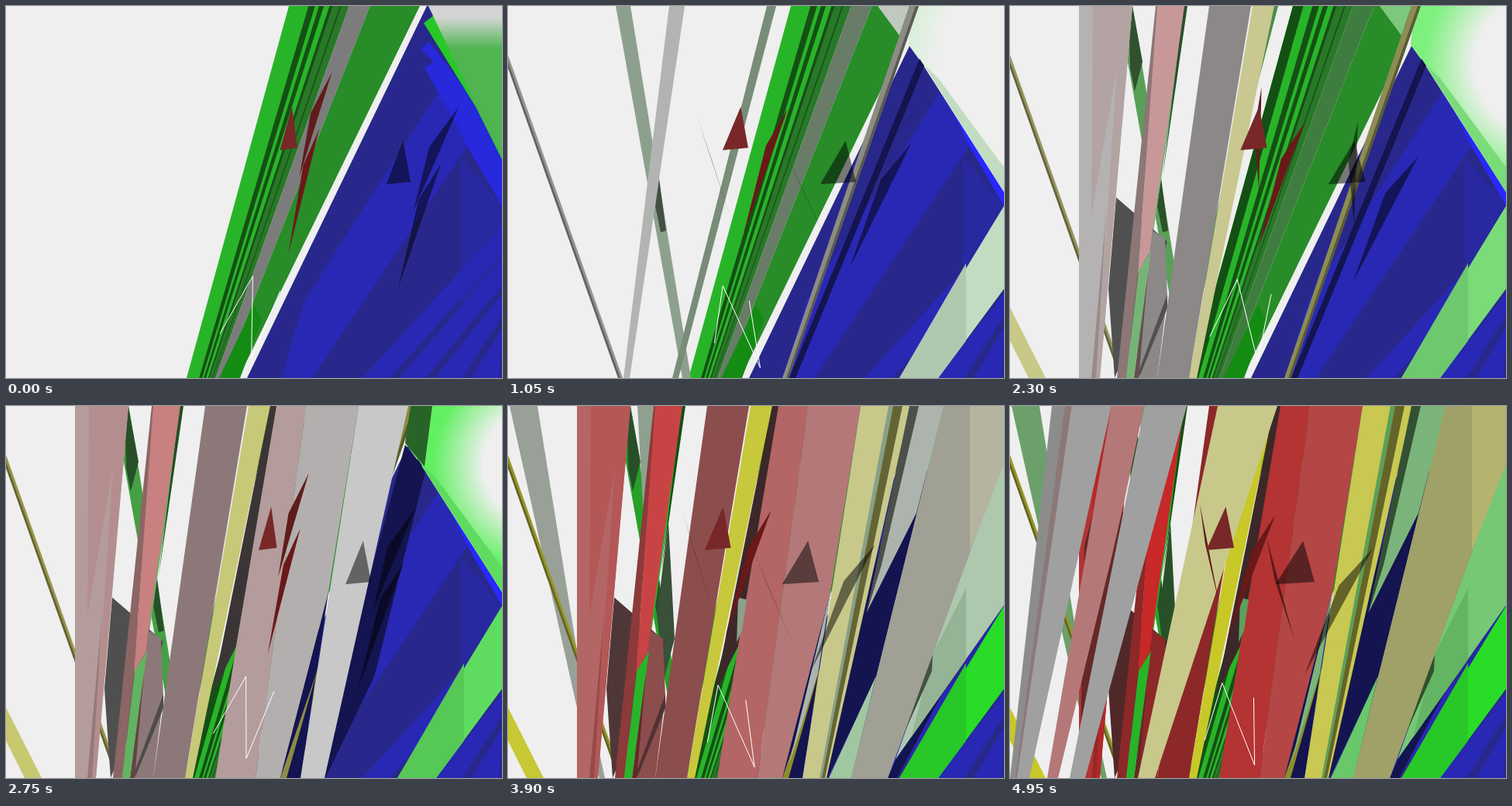
An HTML page with a canvas that plays this animation: 640 px wide and 480 px high, repeating every 5 s.

```html
<!DOCTYPE html>
<html>
<head>
<meta charset="utf-8">
<style>
html, body { margin: 0; width: 100%; height: 100%; overflow: hidden; background: #efefef; }
canvas { display: block; width: 640px; height: 480px; }
</style>
</head>
<body>
<canvas id="stage" width="640" height="480"></canvas>
<script>
const ctx = document.getElementById('stage').getContext('2d');
const LOOP = 5000, STEP = 50, PAPER = '#efefef', NIGHT = '#141450';
const paths = new Map();
let now = 0;

// Fill a polygon once its start time has come.
function poly(start, color, points) {
  if (now < start) return;
  if (!paths.has(points)) paths.set(points, new Path2D('M' + points + 'Z'));
  ctx.fillStyle = color;
  ctx.fill(paths.get(points));
}

// A full-height beam: top edge a..b, bottom edge c..d.
function beam(start, color, a, b, c, d) {
  poly(start, color, `${a} 0 ${b} 0 ${d} 480 ${c} 480`);
}

// Gray that drains toward a hue, at a rate in proportion to its brightness.
function hue(channels, high, since, floor = 40) {
  const drained = high * (1 - 0.000265 * Math.max(0, now - since));
  const low = Math.round(Math.max(floor, drained));
  return 'rgb(' + [...'rgb'].map(c => channels.includes(c) ? high : low) + ')';
}

function drawBlue() {
  poly(0, '#28288c', '543 0 640 0 640 480 311 480');
  poly(0, '#2828b4', '566 98 596 180 395 480 355 480 385 380');
  poly(0, '#2828a0', '587 195 640 258 640 365 587 420');
  for (let i = 0; i < 4; i++) {
    const y = 283 + 44 * i, x = 460 + 47 * i;
    poly(0, '#2828b4', `640 ${y} 640 ${y + 36 - 4 * i} ${x + 35} 480 ${x} 480`);
  }
  poly(0, '#2828ff', '560 108 545 80 640 190 640 258 595 180');
  if (now >= 550) return;
  poly(0, '#2828dc', '535 56 546 46 640 170 640 256 540 80 552 72');
  poly(0, '#28c828', '539 22 552 12 640 170 640 198 606 130');
  const sky = ctx.createLinearGradient(0, 15, 0, 55);
  sky.addColorStop(0, '#d4d4d4');
  sky.addColorStop(1, '#50b450');
  poly(0, sky, '545 0 640 0 640 196 612 140');
}

// Stripes run between the two edges of the band, crowding left at the top.
function greenStripe(color, from, to, start = 0) {
  const top = u => 365 + 169 * u, bottom = u => 233 + 67 * u ** 0.75;
  beam(start, color, top(from), top(to), bottom(from), bottom(to));
}

function drawGreen() {
  greenStripe('#28b428', 0, 0.31);
  greenStripe('#287828', 0.31, 0.46);
  greenStripe(hue('g', 124, 450), 0.46, 0.62);
  greenStripe('#288c28', 0.62, 1);
  for (let i = 0; i < 4; i++) greenStripe('#145014', 0.15 + 0.08 * i, 0.2 + 0.067 * i);
  greenStripe('#145014', 0, 0.08, 1500);
  poly(0, '#148c14', '275 480 302 480 330 405 320 385');
}

function drawCorner() {
  if (now < 550) return;
  const opening = '522 0 640 0 640 240 535 75 517 50';
  poly(0, PAPER, '543 0 ' + opening);
  const inner = Math.max(5, 135 - Math.max(0, now - 1050) * 0.036);
  const glow = ctx.createRadialGradient(690, 75, inner, 690, 75, inner + 65);
  glow.addColorStop(0, PAPER);
  glow.addColorStop(1, hue('g', 240, 500));
  poly(0, glow, opening);
  poly(0, hue('g', 200, 900), '477 0 518 0 505 38');
  poly(850, hue('g', 220, 600), '536 75 555 93 640 208 640 240');
  poly(850, hue('g', 220, 600), '640 258 640 365 555 480 505 480');
  poly(850, hue('g', 200, 600), '591 332 591 432 555 480 505 480');
}

function drawEarlyBeams() {
  poly(3750, hue('g', 160, 3700), '2 0 38 0 88 310 125 480 118 480 88 385');
  poly(800, hue('rg', 150, 900), '0 63 0 80 142 480 148 480');
  poly(800, hue('rg', 100, 900), '0 72 0 80 142 480 145 480');
  poly(1300, hue('rg', 200, 1100), '0 389 46 480 24 480 0 432');
  beam(600, hue('g', 160, 600), 139, 158, 225, 236);
  poly(1000, hue('g', 80, 500), '195 222 204 290 197 292 190 258');
  poly(1500, hue('g', 80, 800), '153 0 158 0 171 72 161 110 155 80');
  beam(500, hue('g', 140, 500), 334, 346, 212, 220);
  beam(500, hue('g', 180, 1000), 208, 228, 149, 157);
  poly(1500, hue('g', 80, 500, 20), '224 0 229 0 197 220');
  beam(900, hue('rg', 140, 800), 518, 530, 354, 362);
  beam(900, hue('rg', 90, 800), 526, 530, 359, 362);
  poly(900, NIGHT, '531 68 537 77 371 480 363 480');
}

function drawLeft() {
  poly(3750, hue('g', 160, 3500), '167 0 188 0 180 110 174 130');
  poly(3750, hue('g', 80, 2800), '207 150 215 300 202 350 192 270');
  poly(2300, hue('r', 80, 2700), '137 247 203 304 190 350 135 480 127 365');
  poly(2300, hue('r', 140, 2200), '184 290 200 300 203 375 190 480 163 480 166 395');
  poly(2300, hue('r', 80, 2500), '203 372 203 390 168 476 163 480');
  beam(1650, hue('r', 180, 2250), 89, 158, 89, 116);
  poly(1900, hue('r', 180, 1950), '107 0 158 0 116 480 106 480 124 290 138 80 105 270');
  poly(1650, hue('r', 150, 2000), '124 268 111 480 105 480');
  poly(2000, hue('r', 140, 1700), '188 0 191 0 165 345 150 480 138 480');
  poly(1450, hue('r', 200, 1400), '190 0 225 0 180 318 165 345');
  poly(1450, hue('g', 180, 1000), '182 316 160 480 150 480 166 342');
  poly(1450, hue('r', 100, 1500), '178 345 166 480 160 480');
}

function drawCenter() {
  beam(2300, hue('r', 140, 2200), 257, 311, 190, 231);
  beam(1400, hue('rg', 200, 1250), 313, 341, 231, 241);
  poly(2400, hue('r', 60, 2300), '341 0 352 0 297 310 266 372');
  poly(2400, hue('r', 180, 2250), '349 0 387 0 322 480 270 480 297 310');
  poly(2400, hue('r', 180, 2650), '387 0 455 0 416 240 354 480 322 480');
  poly(3300, hue('g', 160, 3400), '297 247 308 250 302 290 295 305');
  poly(2400, NIGHT, '416 240 380 480 354 480');
  poly(2400, hue('rg', 140, 800), '402 340 362 480 354 480');
  poly(3700, hue('g', 180, 3750), '416 240 400 345 362 465');
}

function drawRight() {
  poly(2450, NIGHT, '515 50 541 85 475 350 412 480 400 480');
  poly(2450, hue('g', 100, 500), '522 0 550 0 540 78 515 48');
  beam(2550, hue('rg', 200, 2750), 455, 519, 380, 411);
  beam(3300, hue('g', 160, 3300), 491, 497, 402, 405);
  beam(3300, hue('rg', 100, 2100), 497, 509, 405, 409);
  poly(3700, hue('g', 180, 3750), '519 0 562 0 527 138 463 266');
  poly(3700, hue('g', 80, 3650), '518 0 530 0 482 205 463 266');
  poly(3350, hue('g', 200, 3150), '475 348 443 480 414 480');
  poly(3350, NIGHT, '548 350 585 325 502 480 490 480');
  poly(3350, hue('g', 200, 3400), '640 72 640 257 500 456 548 320 596 188');
  poly(3350, hue('g', 180, 3250), '591 235 591 327 520 428 548 320');
  poly(3350, hue('g', 80, 3400), '548 320 547 342 490 470 500 440');
  poly(3350, hue('rg', 180, 3500), '562 0 640 0 640 75 596 188 490 480 443 480 475 350');
  poly(3350, hue('rg', 160, 3650), '562 0 596 0 596 188 490 480 443 480 475 350');
}

function drawLateBeams() {
  poly(4000, hue('r', 100, 2000), '96 180 131 50 147 120 120 400 90 480');
  poly(4050, hue('r', 180, 3700), '131 0 173 0 147 125 130 200 62 480 48 480');
  beam(4650, '#a0a0a0', 80, 131, 8, 25);
  beam(4650, '#8c8c8c', 54, 72, 0, 8);
  beam(4650, '#8c7878', 71, 80, 7, 9);
  beam(4700, '#a0a0a0', 174, 228, 77, 97);
  beam(4050, hue('rg', 200, 3800), 268, 345, 165, 187);
}

// Corners are x from the axis, y on the stage, depth.
const blades = [
  { lift: -55, color: '#5f1c1c', corners: [[-52, 138, 68], [-37, 190, 34], [-12, 272, 10]] },
  { lift: 25, color: '#6b1818', corners: [[61, 135, 12], [32, 182, 0], [2, 297, -10]] },
  { lift: 0, color: '#782828', corners: [[-25, 186, -12], [-1, 130, -4], [9, 183, 0]] }
];
const wire = [[-31, 434, -32], [-17, 360, 8], [30, 466, -10], [19, 379, 33]];

function trace(points) {
  ctx.beginPath();
  for (const [x, y] of points) ctx.lineTo(x, y);
}

// The pieces swing about an upright axis that sways and drifts left.
function drawTumblers() {
  const sway = Math.cos(2 * Math.PI * now / 2900);
  const yaw = 0.8 * (sway + 0.55);
  const axis = 335 + 38 * sway - 0.009 * now;
  const turn = (corners, cx, lift) => corners.map(([x, y, z]) =>
    [cx + x * Math.cos(yaw) + z * Math.sin(yaw), y + lift * Math.sin(yaw)]);
  const shapes = blades.map(b => turn(b.corners, axis, b.lift));

  const cast = 145 - 0.009 * now;
  ctx.fillStyle = 'rgba(0,0,0,.5)';
  for (const shape of shapes) {
    trace(shape.map(([x, y]) => [x + cast + 0.4 * (x - axis), y + 44]));
    ctx.fill();
  }
  blades.forEach((blade, i) => {
    ctx.fillStyle = blade.color;
    trace(shapes[i]);
    ctx.fill();
  });
  trace(turn(wire, 293 + 0.3 * (axis - 295), -12));
  ctx.strokeStyle = '#fff';
  ctx.lineWidth = 1;
  ctx.stroke();
}

function draw(time) {
  now = Math.floor((time % LOOP) / STEP) * STEP;
  ctx.fillStyle = PAPER;
  ctx.fillRect(0, 0, 640, 480);
  drawBlue();
  drawGreen();
  drawCorner();
  drawEarlyBeams();
  drawLeft();
  drawCenter();
  drawRight();
  drawLateBeams();
  drawTumblers();
}

const begin = performance.now();
function tick() {
  draw(performance.now() - begin);
  requestAnimationFrame(tick);
}
tick();
</script>
</body>
</html>
```
